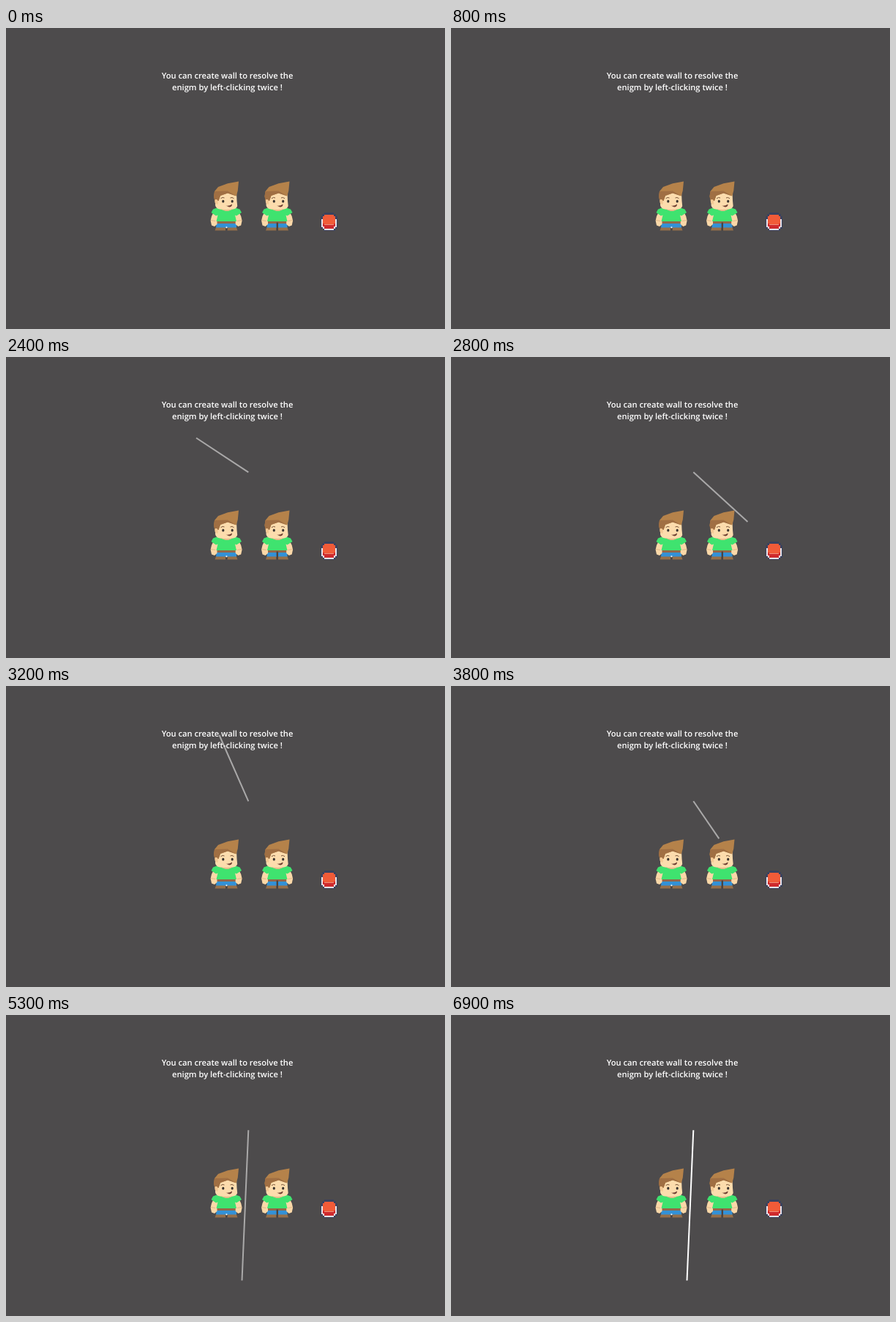
An HTML page for the animation above (8 s loop, 600x411 px).

```html
<!DOCTYPE html>
<html lang="en">
<head>
<meta charset="utf-8">
<title>Wall tutorial</title>
<style>
  html, body { margin: 0; width: 100%; height: 100%; overflow: hidden; background: #4d4b4c; }
  svg { display: block; width: 100%; height: 100%; }
  text {
    font: 600 11.15px "Open Sans", "Noto Sans", sans-serif;
    fill: #fff; text-anchor: middle; text-rendering: geometricPrecision;
  }
</style>
</head>
<body>
<svg viewBox="0 0 600 411">
  <defs>
    <g id="hero">
      <!-- legs -->
      <path d="M288 262 H315 V273 H287 Z" fill="#3391d6"/>
      <path d="M288 263 H315 V267 H288 Z" fill="#93694a"/>
      <path d="M287 272.5 H300 V276.5 H285.5 Z M302.5 272.5 H315 L316.5 276.5 H302.5 Z" fill="#96704a"/>
      <!-- arms -->
      <path id="arm" d="M284 251 L281 257 L279.6 263 L281 269.5 L285 271 L288.5 268 L288.5 262 L290.5 255 Z" fill="#fad8a8"/>
      <use href="#arm" transform="matrix(-1 0 0 1 602.2 0)"/>
      <path d="M280 262.5 L286 263.5 M322 262.5 L316 263.5" stroke="#d9b083" stroke-width=".8"/>
      <!-- shirt -->
      <path d="M287 246 H315 L319.5 247.5 L322 252 L315 256.5 L313 255.5 L315 264 H287.5 L289.5 255.5 L287 256.5 L280.5 252 L283 247.5 Z" fill="#3fe36f"/>
      <!-- head -->
      <path d="M287 224 H315 L315.5 236 L316.2 243 Q315 247 310 247.5 L303 249.5 L293 247.5 Q287 247 286 242 Z" fill="#fcdcad"/>
      <path d="M292 247 Q302 249 311 247 L304 250 H300 Z" fill="#e6bb8b"/>
      <path d="M285 223 L290 217 L303 212.3 L318 209.6 L316.8 222 L314.8 229.5 L303 225.5 L293 229 L290.5 236 L285.5 236.5 L284 230 Z" fill="#b5824a"/>
      <path d="M285 223 L303 222.5 L314.8 229.5 L303 225.5 L293 229 L290.5 236 L285.5 236.5 L284 230 Z" fill="#a06f43"/>
      <path d="M285.4 234.5 Q288.5 233 289.6 236 V240.5 Q286 241.5 285.4 238 Z" fill="#f3c995"/>
      <path d="M293.5 232.8 Q296 230.5 298.5 232 M306.5 232 Q309 230.5 311.5 232.8" fill="none" stroke="#79553a"/>
      <ellipse cx="296.8" cy="236.7" rx="1.6" ry="1.9" fill="#39332f"/>
      <ellipse cx="309.2" cy="236.7" rx="1.6" ry="1.9" fill="#39332f"/>
      <path d="M300.5 242.5 Q305 243.4 309 240.5 Q309 244.4 305 244.4 Z" fill="#6d3d31"/>
    </g>
    <g id="button" shape-rendering="crispEdges">
      <path d="M435 252 H448 V254 H451 V257 H453 V274 H450 V277 H434 V274 H430 V257 H432 V254 H435 Z" fill="#3a425e"/>
      <path d="M431 261 H434 V271 H436 V274 H448 V271 H450 V261 H452 V272 H450 V274 H448 V276 H435 V274 H433 V272 H431 Z" fill="#e6e4ea"/>
      <path d="M433 266 H450 V271 H448 V274 H435 V271 H433 Z" fill="#cf2a2d"/>
      <path d="M435 255 H448 V257 H450 V267 H448 V269 H435 V267 H433 V257 H435 Z" fill="#f15b38"/>
      <path d="M435 268 H448 V269 H435 Z" fill="#ee8f7c"/>
    </g>
  </defs>
  <rect width="600" height="411" fill="#4d4b4c"/>
  <use href="#hero"/>
  <path d="M300 272.5 H302.5 V276 H300 Z" fill="#4b433e"/>
  <circle cx="301.4" cy="272.3" r="1.1" fill="#fff"/>
  <use href="#hero" x="69.5"/>
  <path d="M369.6 265.5 H372 V276.5 H369.6 Z" fill="#4b433e"/>
  <use href="#button"/>
  <line id="wall" x1="331.3" y1="157.3" stroke-width="2"/>
  <text x="302.5" y="69.2">You can create wall to resolve the</text>
  <text x="302.5" y="85.4">enigm by left-clicking twice !</text>
</svg>
<script>
  const LOOP = 8000, STEP = 100, START = 1600, PLACED = 6900;

  // Turning points of the pointer while it aims the wall
  const keys = [
    { t: 1600, x: 325, y: 178 },
    { t: 1800, x: 286, y: 324 },
    { t: 2100, x: 192, y: 220 },
    { t: 2400, x: 260, y: 110.5 },
    { t: 2600, x: 350, y: 64 },
    { t: 2900, x: 410, y: 272 },
    { t: 3200, x: 291.5, y: 67 },
    { t: 3400, x: 374, y: 85 },
    { t: 4200, x: 340.5, y: 331 },
    { t: 4400, x: 332.3, y: 345 },
    { t: 4900, x: 322.3, y: 360 },
    { t: 5300, x: 322.5, y: 362.5 }
  ];
  const last = keys.length - 1;
  const wall = document.getElementById("wall");

  // Speed along one axis at key i, from its neighbours
  function slope(i, axis) {
    const a = keys[Math.max(i - 1, 0)], b = keys[Math.min(i + 1, last)];
    return (b[axis] - a[axis]) / (b.t - a.t);
  }

  // Smooth cubic curve through the keys
  function aim(t, axis) {
    if (t >= keys[last].t) return keys[last][axis];
    const i = keys.findIndex(k => k.t > t) - 1;
    const a = keys[i], b = keys[i + 1], span = b.t - a.t;
    const u = (t - a.t) / span, v = 1 - u;
    return a[axis] * v * v * (1 + 2 * u) + b[axis] * u * u * (1 + 2 * v)
      + span * u * v * (v * slope(i, axis) - u * slope(i + 1, axis));
  }

  function draw(time) {
    const t = Math.floor((time % LOOP) / STEP) * STEP;
    const shown = t >= START;
    wall.setAttribute("visibility", shown ? "visible" : "hidden");
    if (!shown) return;
    wall.setAttribute("x2", aim(t, "x"));
    wall.setAttribute("y2", aim(t, "y"));
    wall.setAttribute("stroke", t >= PLACED ? "#fff" : "#aaa9a9");
  }

  const begin = performance.now();
  function tick() {
    draw(performance.now() - begin);
    requestAnimationFrame(tick);
  }
  tick();
</script>
</body>
</html>
```
